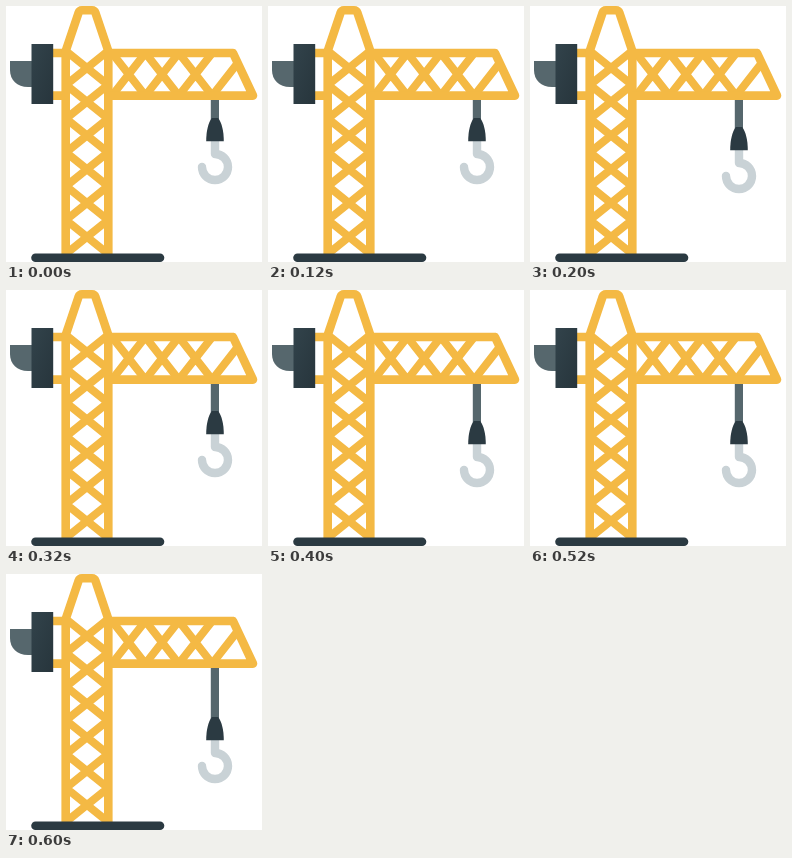
Write an HTML page that moves like this. It is 256 px wide and 256 px high and loops after 0.8 s.

```html
<!DOCTYPE html>
<html lang="en">
<head>
<meta charset="utf-8">
<title>Tower crane</title>
<style>
  html, body { margin: 0; width: 100%; height: 100%; overflow: hidden; background: #fff; }
  svg { display: block; width: 100vw; height: 100vh; }
  .steel { fill: none; stroke: #f4b944; stroke-width: 8.6; stroke-linejoin: round; }
  .brace { stroke-width: 8; }
</style>
</head>
<body>
<svg viewBox="0 0 256 256">
  <defs>
    <linearGradient id="dark" x1="0" y1="0" x2="1" y2="1">
      <stop offset="0" stop-color="#32434b"/>
      <stop offset="1" stop-color="#27353c"/>
    </linearGradient>
    <clipPath id="mastClip"><path d="M56 40H106V248H56Z"/></clipPath>
    <clipPath id="jibClip"><path d="M102 43H228L251 94H102Z"/></clipPath>
  </defs>

  <rect id="rope" x="204.8" y="92" width="8.2" height="24" fill="#56676d"/>
  <g id="load">
    <path d="M209 133V148A13 13 0 1 1 196 161" fill="none" stroke="#c9d2d6" stroke-width="8.4" stroke-linecap="round" stroke-linejoin="round"/>
    <path d="M205.8 112H212.2C215.8 117 217.8 125 217.8 135.3H200.2C200.2 125 202.2 117 205.8 112Z" fill="#2b3a42"/>
  </g>

  <path d="M4 55H27V81H22C11 81 4 74 4 64Z" fill="#56676d"/>
  <path class="steel" d="M46 47H60M46 89.6H60"/>
  <rect x="25.5" y="38" width="21.7" height="60" fill="url(#dark)"/>

  <path id="mastBraces" class="steel brace" clip-path="url(#mastClip)"/>
  <path id="jibBraces" class="steel brace" clip-path="url(#jibClip)"/>
  <path class="steel" d="M59.7 248V45L72.5 7Q73.5 4.3 76 4.3H86Q88.5 4.3 89.5 7L102.3 45V248"/>
  <path class="steel" d="M102 47H227L247 89.6H102"/>
  <path d="M29.5 251.7H154" stroke="#2b3a42" stroke-width="8.6" stroke-linecap="round"/>
</svg>
<script>
  const byId = id => document.getElementById(id);
  const DROPS = [0, 9, 19, 31];
  const STEP = 200;

  // A row of crossed braces filling one bay
  const cross = (x1, y1, x2, y2) => `M${x1} ${y1}L${x2} ${y2}M${x2} ${y1}L${x1} ${y2}`;

  const mastBay = 33.8, jibBay = 33.4;
  let mast = "", jib = "";
  for (let i = 0; i < 6; i++) {
    const y = 45 + i * mastBay;
    mast += cross(60, y, 102, y + mastBay);
  }
  for (let i = 0; i < 3; i++) {
    const x = 106 + i * jibBay;
    jib += cross(x, 47, x + jibBay, 89.6);
  }
  jib += "M206.2 89.6L239.6 47";
  byId("mastBraces").setAttribute("d", mast);
  byId("jibBraces").setAttribute("d", jib);

  function draw(now) {
    const drop = DROPS[Math.floor(now / STEP) % DROPS.length];
    byId("load").setAttribute("transform", `translate(0 ${drop})`);
    byId("rope").setAttribute("height", 24 + drop);
    requestAnimationFrame(draw);
  }
  draw(performance.now());
</script>
</body>
</html>
```
